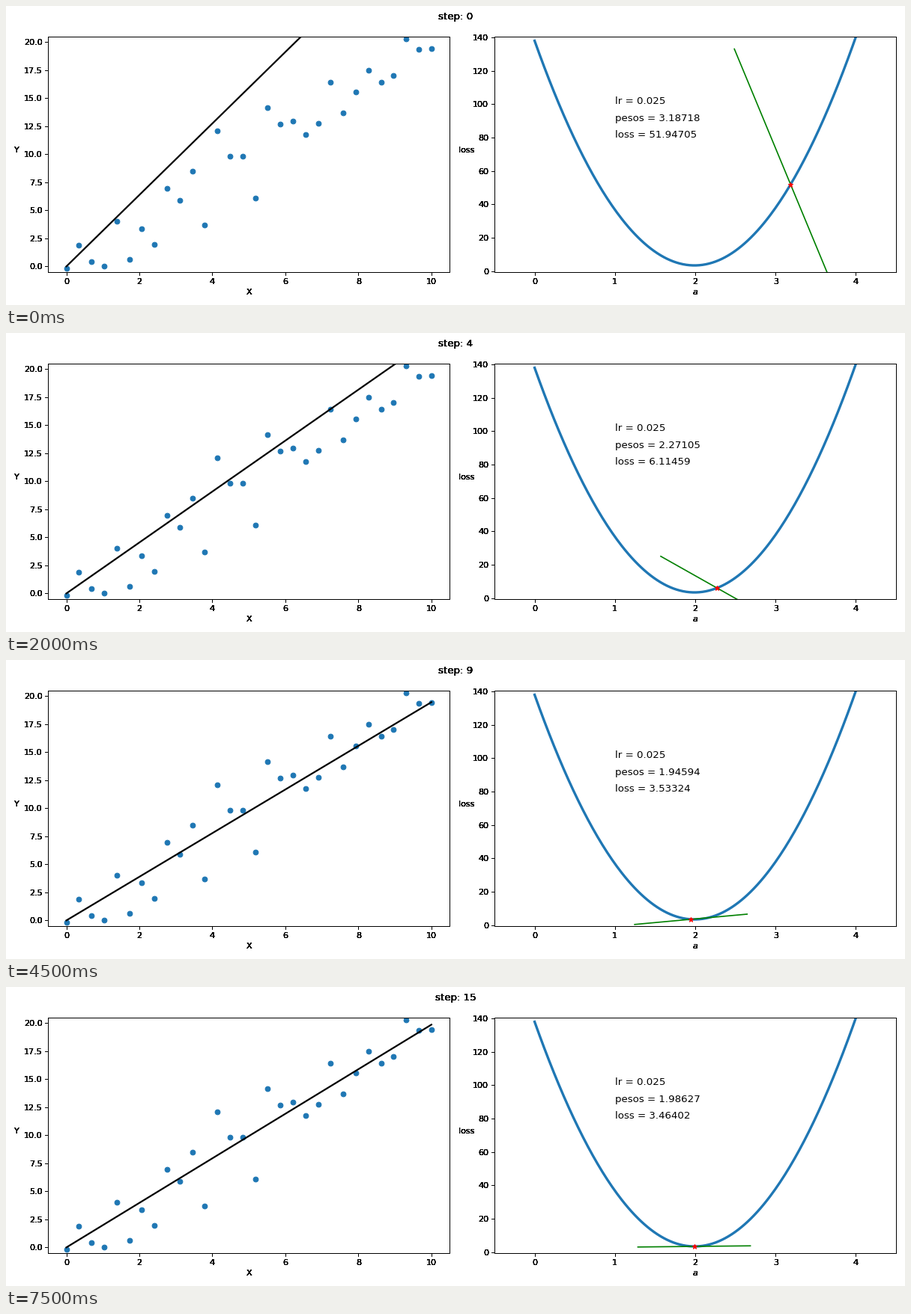
A matplotlib script that plays this animation: 1200 px wide and 400 px high, repeating every 8 s.

```python
import matplotlib.pyplot as plt
import numpy as np
from matplotlib.animation import FuncAnimation

WIDTH, HEIGHT, DPI = 1200, 400, 80
TOP, BOTTOM = 40.8, 355.9
STEPS, INTERVAL = 16, 500
PASSES = 6  # repeated passes give the outer text its heavy edges

LR = 0.025
X = np.linspace(0, 10, 30)
Y = [-0.17, 1.90, 0.43, 0.03, 4.03, 0.63, 3.36, 1.95, 6.96, 5.90,
     8.50, 3.70, 12.10, 9.82, 9.82, 6.10, 14.17, 12.70, 12.96, 11.77,
     12.78, 16.43, 13.70, 15.56, 17.50, 16.45, 17.03, 20.30, 19.37, 19.42]

CURVATURE = np.mean(X ** 2)
BEST, MIN_LOSS = 1.991411, 3.46312
START_OFFSET = 1.1957697
TANGENT_REACH = 0.7


def loss(w):
    return MIN_LOSS + CURVATURE * (w - BEST) ** 2


def gradient(w):
    return 2 * CURVATURE * (w - BEST)


def weight(step):
    """Weight after a number of gradient descent steps."""
    return BEST + START_OFFSET * (1 - 2 * LR * CURVATURE) ** step


def make_axes(left, right, xlim, ylim, xlabel, ylabel):
    """Stack identical axes; the lowest one carries the data."""
    rect = [left / WIDTH, 1 - BOTTOM / HEIGHT,
            (right - left) / WIDTH, (BOTTOM - TOP) / HEIGHT]
    stack = []
    for level in range(PASSES):
        ax = fig.add_axes(rect, zorder=level, label=f"{ylabel}{level}")
        ax.set(xlim=xlim, ylim=ylim, xlabel=xlabel)
        ax.set_ylabel(ylabel, rotation=0, labelpad=8)
        ax.patch.set_visible(level == 0)
        stack.append(ax)
    return stack[0]


fig = plt.figure(figsize=(WIDTH / DPI, HEIGHT / DPI), dpi=DPI, facecolor="white")
titles = [fig.text(0.5, 0.98, "", ha="center", va="top", size=12)
          for _ in range(PASSES)]

fit_ax = make_axes(56.2, 592.2, (-0.5, 10.5), (-0.5, 20.5), "X", "Y")
fit_ax.scatter(X, Y)
fit_line, = fit_ax.plot([], [], color="black", lw=2)

loss_ax = make_axes(652, 1188, (-0.5, 4.5), (-0.5, 140.5), "$a$", "loss")
grid = np.linspace(0, 4, 200)
loss_ax.plot(grid, loss(grid), lw=3)
tangent, = loss_ax.plot([], [], color="green", lw=1.5)
star, = loss_ax.plot([], [], "r*")
loss_ax.text(1, 100, f"lr = {LR}", size=12)
weight_text = loss_ax.text(1, 90, "", size=12)
loss_text = loss_ax.text(1, 80, "", size=12)


def draw(step):
    w = weight(step)
    height, slope = loss(w), gradient(w)
    for title in titles:
        title.set_text(f"step: {step}")
    fit_line.set_data([0, 10], [0, 10 * w])
    tangent.set_data([w - TANGENT_REACH, w + TANGENT_REACH],
                     [height + slope, height - slope])
    star.set_data([w], [height])
    weight_text.set_text(f"pesos = {w:.5f}")
    loss_text.set_text(f"loss = {height:.5f}")


anim = FuncAnimation(fig, draw, frames=STEPS, init_func=lambda: draw(0),
                     interval=INTERVAL, repeat=True, repeat_delay=0)
plt.show()
```
